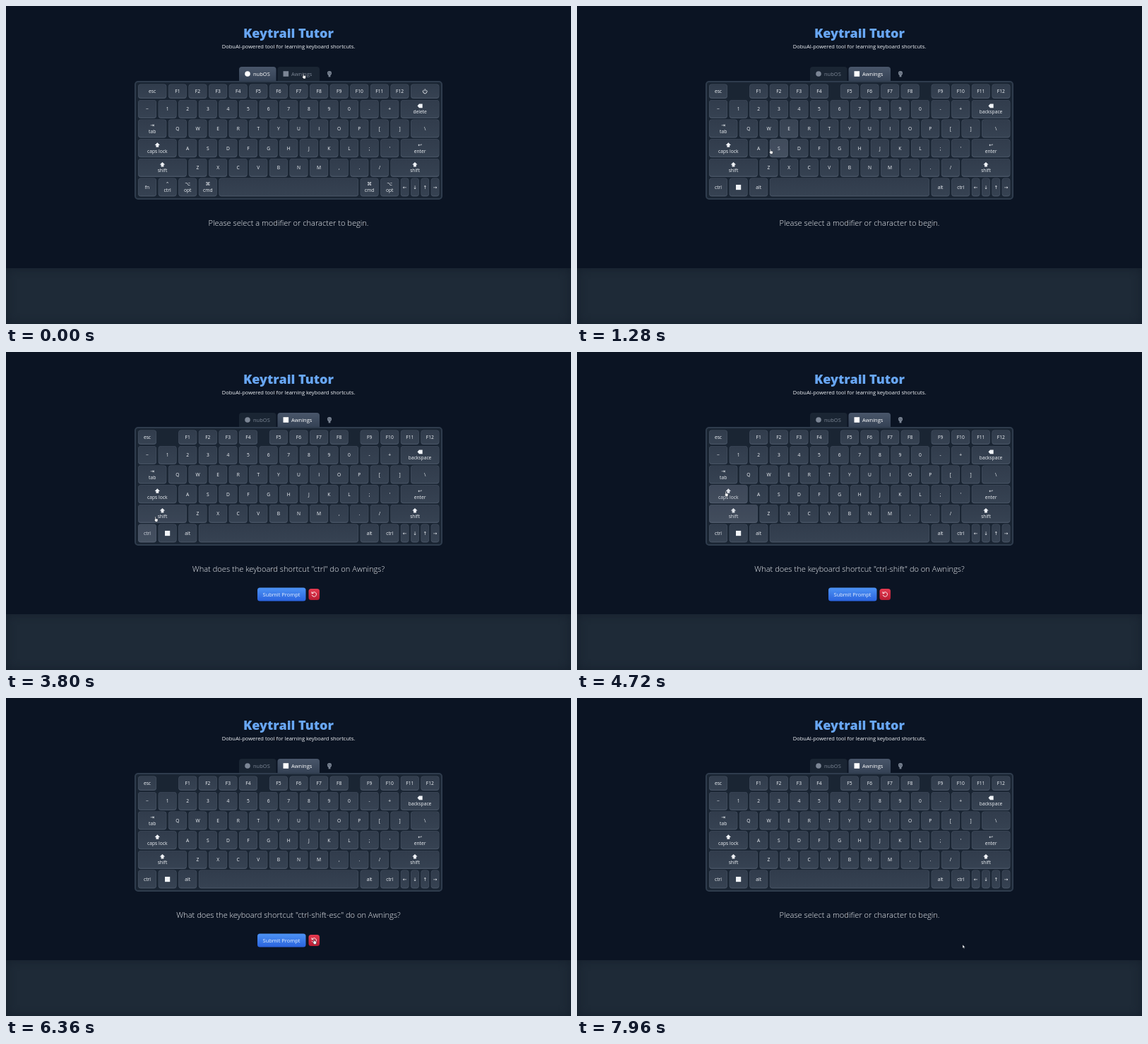
Animation, 800 px wide and 450 px high, one loop 8000 ms. Source, as an HTML page:

```html
<!DOCTYPE html>
<html lang="en">
<head>
<meta charset="utf-8">
<style>
  html, body { margin: 0; width: 100%; height: 100%; overflow: hidden; background: #0b1423; }
  svg { position: absolute; left: 0; top: 0; width: 800px; height: 450px; }
  footer { position: absolute; left: 0; top: 371px; width: 800px; height: 79px;
    background: #1e2a37; box-shadow: inset 0 0 14px #151f2c; }
  text { font-family: "Open Sans", "Noto Sans", sans-serif; fill: #f1f4f8; }
  .mid { text-anchor: middle; }
  .glyph { font-family: "DejaVu Sans", sans-serif; }
</style>
</head>
<body>
<footer></footer>
<svg viewBox="0 0 800 450">
  <defs>
    <linearGradient id="key" x2="0" y2="1"><stop stop-color="#313c4c"/><stop offset="1" stop-color="#364252"/></linearGradient>
    <linearGradient id="tab" x2="0" y2="1"><stop stop-color="#49566a"/><stop offset="1" stop-color="#354255"/></linearGradient>
    <linearGradient id="blue" x2="0" y2="1"><stop stop-color="#4d93f5"/><stop offset="1" stop-color="#2a63de"/></linearGradient>
    <linearGradient id="red" x2="0" y2="1"><stop stop-color="#e63a50"/><stop offset="1" stop-color="#b81d33"/></linearGradient>
  </defs>
  <text class="mid" x="400" y="44.5" style="font-size:18px;font-weight:800;fill:#68a6f3">Keytrail Tutor</text>
  <text class="mid" x="400" y="59.7" style="font-size:7.5px">DobuAI-powered tool for learning keyboard shortcuts.</text>
  <g id="tabs"></g>
  <g fill="#7c8695">
    <circle cx="458" cy="95" r="3.1"/>
    <path d="M456.6 98h2.8v2.4h-2.8z"/>
    <path d="M456 95.5l1.5-1.8M458.2 96.5l1.5-2" stroke="#1a2533" stroke-width=".7"/>
  </g>
  <rect x="183" y="107" width="434" height="166" rx="4" fill="#1a2533" stroke="#2f3c4d" stroke-width="2"/>
  <g id="mac"></g>
  <g id="win"></g>
  <rect id="glow" rx="4" fill="#7b8696"/>
  <rect id="glow2" rx="4" fill="#7b8696"/>
  <text id="prompt" class="mid" x="400" y="311" style="font-size:11.1px;font-weight:300"></text>
  <g id="buttons">
    <rect x="356" y="333.5" width="68.5" height="19" rx="3.5" fill="url(#blue)"/>
    <text class="mid" x="390" y="345.8" style="font-size:7.5px;fill:#e3edfd">Submit Prompt</text>
    <rect x="428.5" y="335" width="15.5" height="16" rx="3.5" fill="url(#red)"/>
    <path d="M433.6 341.2a3.2 3.2 0 1 1-.4 2.6M433 339.2v2.4h2.4" fill="none" stroke="#fff" stroke-width=".9"/>
  </g>
  <g id="cursor" stroke="#141c28" stroke-width=".5">
    <path id="arrow" fill="#fff" d="M0 0v5l1.2-1 .8 1.7.9-.4-.8-1.6h1.5z"/>
    <path id="hand" fill="#fff" d="M-.6.4q.6-.8 1.2 0v2.4l2.4.5q.7.2.6 1L3 7.4H.3L-1.8 4.6q.1-.8 1.2-.1z"/>
  </g>
</svg>
<script>
const $ = id => document.getElementById(id);
const LOOP = 8000, UNIT = 28.6, LEFT = 187, GAP = 2.6;
const CLICK = { tab: 440, ctrl: 2400, shift: 4200, esc: 5100, reset: 6400 };

// Key notation: label[:width in units[:icon]]; "_" is an empty gap
const middle = back => [
  `~ 1 2 3 4 5 6 7 8 9 0 - + ${back}:2:del`,
  'tab:1.5:⇥ Q W E R T Y U I O P [ ] \\:1.5',
  "caps_lock:2:up A S D F G H J K L ; ' enter:2:↩",
  'shift:2.5:up Z X C V B N M , . / shift:2.5:up'
];
const arrows = '←:.5 ↓:.5 ↑:.5 →:.5';
const layouts = {
  mac: ['esc:1.5 F1 F2 F3 F4 F5 F6 F7 F8 F9 F10 F11 F12 :1.5:power', ...middle('delete'),
    `fn ctrl:1:⌃ opt:1:⌥ cmd:1:⌘ :7 cmd:1:⌘ opt:1:⌥ ${arrows}`],
  win: ['esc _ F1 F2 F3 F4 _:.5 F5 F6 F7 F8 _:.5 F9 F10 F11 F12', ...middle('backspace'),
    `ctrl :1:square alt :8 alt ctrl ${arrows}`]
};
const icons = {
  up: 'M0-3.4l3.7 3.7h-1.8v2.9h-3.8v-2.9h-1.8z',
  del: 'M-3.6 0l2.5-2.8h4.7v5.6h-4.7z',
  square: 'M-3.6-3.6h7.2v7.2h-7.2z',
  power: 'M-1.7-2a2.8 2.8 0 1 0 3.4 0M0-3.4v3.2'
};

const rect = (x, y, w, h, r, fill) =>
  `<rect x="${x}" y="${y}" width="${w}" height="${h}" rx="${r}" fill="${fill}"/>`;
const label = (s, x, y, size, cls = 'mid', fill = '#f1f4f8') =>
  `<text class="${cls}" x="${x}" y="${y}" style="font-size:${size}px;fill:${fill}">${s}</text>`;

function icon(name, x, y) {
  if (!icons[name]) return label(name, x, y + 2.4, 6.8, 'mid glyph');
  const paint = name == 'power' ? 'fill="none" stroke="#f1f4f8" stroke-width=".9"' : 'fill="#f1f4f8"';
  return `<path transform="translate(${x} ${y})" d="${icons[name]}" ${paint}/>`;
}

function drawLayout(rows) {
  const keys = [];
  let svg = '';
  rows.forEach((row, r) => {
    let x = LEFT;
    const y = r ? 105.3 + 27.65 * r : 110.5, h = r ? 26 : 20.5;
    for (const token of row.split(' ')) {
      const [name, units = 1, mark] = token.split(':');
      const w = units * UNIT - GAP, cx = x + w / 2, cy = y + h / 2;
      if (name != '_') {
        keys.push({ x, y, w, h });
        svg += rect(x, y, w, h, 4, '#465263') + rect(x + .5, y + .4, w - 1, h - 1.7, 3.6, 'url(#key)');
        if (mark) svg += icon(mark, cx, name ? cy - 4.6 : cy);
        if (name) {
          const isArrow = arrows.includes(name + ':');
          svg += label(name.replace('_', ' '), cx, cy + (mark ? 6.3 : 2.3), 6.7, isArrow ? 'mid glyph' : 'mid');
        }
      }
      x += units * UNIT;
    }
  });
  return { svg, keys };
}

function drawTabs(win) {
  const tab = (x, w, on) =>
    `<path d="M${x} 106v-16q0-4 4-4h${w - 8}q4 0 4 4v16z" fill="${on ? 'url(#tab)' : '#1a2533'}"/>`;
  const tint = on => on ? '#fff' : '#7c8695';
  return tab(330, 52.5, !win) + `<circle cx="342" cy="96" r="3.8" fill="${tint(!win)}"/>` +
    label('nubOS', 350, 98.9, 7.5, '', tint(!win)) +
    tab(384.5, 59.5, win) + rect(392.5, 92.2, 7.6, 7.6, 0, tint(win)) +
    label('Awnings', 404, 98.9, 7.5, '', tint(win));
}

const mac = drawLayout(layouts.mac), win = drawLayout(layouts.win);
$('mac').innerHTML = mac.svg;
$('win').innerHTML = win.svg;

// Pointer path: time, x, y
const path = [
  [0, 421, 95.5], [640, 421, 95.5], [880, 388, 120], [1280, 274, 202], [1600, 214, 249], [1800, 204.5, 255],
  [3760, 204.5, 255], [3800, 211.5, 233], [3920, 214, 229], [4640, 214, 229], [4920, 202, 119],
  [5300, 202, 119], [5440, 218, 136], [5600, 408.5, 331], [5740, 436, 341], [6480, 436, 341],
  [6880, 512, 356], [7400, 538, 353], [7960, 546, 349], [8000, 546, 349]
];
function pointer(t) {
  const i = path.findIndex(p => p[0] > t);
  const [t0, x0, y0] = path[i - 1], [t1, x1, y1] = path[i];
  const k = (t - t0) / (t1 - t0);
  return [x0 + (x1 - x0) * k, y0 + (y1 - y0) * k];
}
const inside = ([px, py], r) => px >= r.x && px <= r.x + r.w && py >= r.y && py <= r.y + r.h;
const tabBox = { x: 330, y: 86, w: 114, h: 20 };
const buttonBoxes = [{ x: 356, y: 333.5, w: 68.5, h: 19 }, { x: 428.5, y: 335, w: 15.5, h: 16 }];

// Share of the last 120 ms spent over a key: a short hover fade
function hover(key, t) {
  let n = 0;
  for (let i = 0; i < 6; i++) n += inside(pointer(Math.max(0, t - i * 20)), key);
  return n / 6;
}

function question(t) {
  if (t < CLICK.ctrl || t >= CLICK.reset) return '';
  return t < CLICK.shift ? 'ctrl' : t < CLICK.esc ? 'ctrl-shift' : 'ctrl-shift-esc';
}

function setGlow(el, hot) {
  el.style.display = hot ? '' : 'none';
  if (!hot) return;
  const { x, y, w, h } = hot.key;
  Object.entries({ x, y, width: w, height: h, opacity: hot.k * .32 })
    .forEach(([name, v]) => el.setAttribute(name, v));
}

let lastTab;
function draw(t) {
  const isWin = t >= CLICK.tab, keys = (isWin ? win : mac).keys, combo = question(t), at = pointer(t);
  if (lastTab !== isWin) {
    $('tabs').innerHTML = drawTabs(isWin);
    $('mac').style.display = isWin ? 'none' : '';
    $('win').style.display = isWin ? '' : 'none';
    lastTab = isWin;
  }
  $('prompt').textContent = combo
    ? `What does the keyboard shortcut "${combo}" do on Awnings?`
    : 'Please select a modifier or character to begin.';
  $('buttons').style.display = combo ? '' : 'none';

  const hot = keys.map(key => ({ key, k: hover(key, t) })).filter(h => h.k).sort((a, b) => b.k - a.k);
  setGlow($('glow'), hot[0]);
  setGlow($('glow2'), hot[1]);

  const targets = [tabBox, ...keys, ...(combo ? buttonBoxes : [])];
  const isHand = targets.some(r => inside(at, r));
  $('hand').style.display = isHand ? '' : 'none';
  $('arrow').style.display = isHand ? 'none' : '';
  $('cursor').setAttribute('transform', `translate(${at})`);
}

const start = performance.now();
function tick() {
  draw((performance.now() - start) % LOOP);
  requestAnimationFrame(tick);
}
tick();
</script>
</body>
</html>
```
